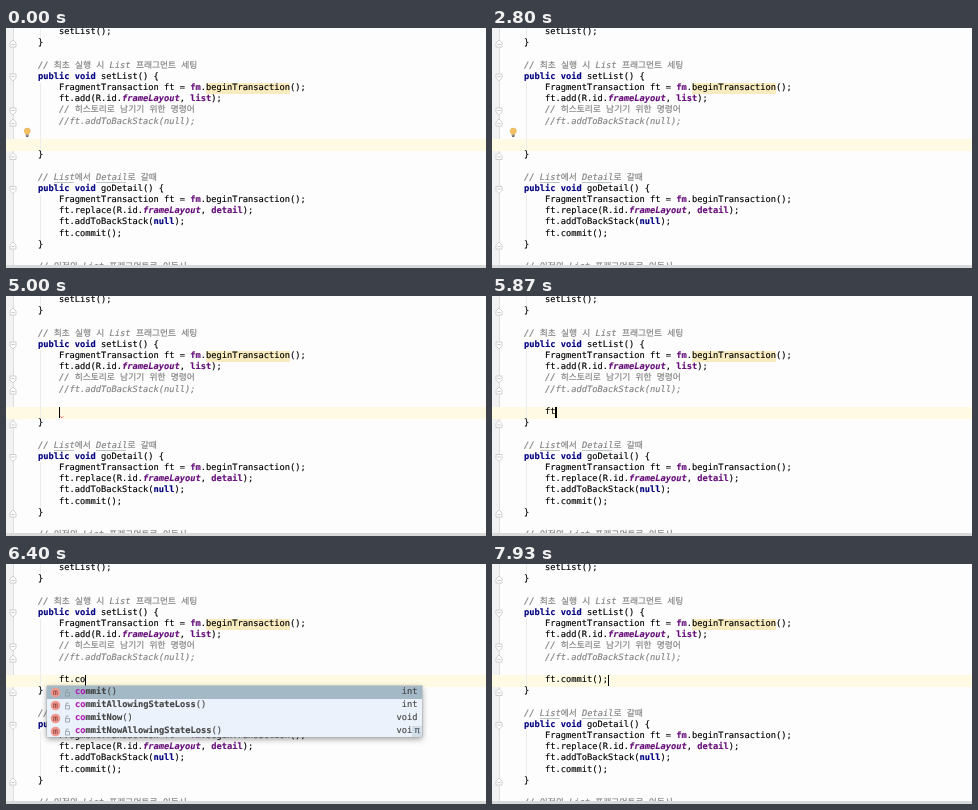
An HTML page that plays this animation: 480 px wide and 240 px high, repeating every 8 s.

```html
<!DOCTYPE html>
<html lang="ko">
<head>
<meta charset="utf-8">
<style>
html, body { margin: 0; width: 100%; height: 100%; overflow: hidden; background: #fefdfe; }
#stage {
  position: relative; width: 480px; height: 240px; overflow: hidden; background: #fefdfe; color: #000;
  font: 8.72px/11.2px "DejaVu Sans Mono", "Noto Sans CJK KR", "Noto Sans CJK", monospace;
  text-rendering: geometricPrecision; -webkit-text-stroke: .15px;
}
#stage div, #stage svg { position: absolute; left: 0; top: 0; }
#code div, #stage #typed, #popup div { white-space: pre; }
#gutter { width: 7px; height: 240px; background: #f3f2f3; border-right: 1px solid #dedede; }
#stage #row { top: 111.3px; width: 480px; height: 11.4px; background: #fffae3; }
#stage #mark { left: 200px; top: 54.5px; width: 84.4px; height: 11.4px; background: #f8ebbf; }
#stage #edge { top: 237px; width: 480px; height: 3px; background: #d9d9d9; }
#stage #typed { left: 53px; top: 111.1px; }
#stage #caret { top: 111.3px; width: 1.4px; height: 11.2px; background: #000; }
#stage #bulb { left: 17.3px; top: 99px; }
#stage #error { left: 54px; top: 119px; }
.key { color: #000080; }
.field { color: #660e7a; }
.res { font-style: italic; }
.note { color: #808080; font-style: italic; }
.note b { font-style: normal; font-weight: 400; }
#stage #popup {
  left: 41px; top: 122.3px; width: 375px; overflow: hidden; background: #ebf2fb;
  box-shadow: 0 0 0 .5px #a9b1b8, 0 2px 6px rgba(0, 0, 0, .4); color: #444;
}
#popup .item { width: 375px; height: 12.8px; line-height: 12.8px; }
#popup .item:first-child { background: #a4b9c6; }
#stage #popup .name { left: 28px; }
#stage #popup .type { left: auto; right: 4.5px; }
#popup em { font-style: normal; color: #b01fb0; }
#stage #thumb { left: 370px; top: 2px; width: 4.5px; height: 62px; border-radius: 2px; background: #6f777d; }
#stage #pi { left: 365px; top: auto; bottom: 0; width: 10px; height: 11px; background: #d3dde6; color: #456; text-align: center; }
</style>
</head>
<body>
<div id="stage">
  <div id="gutter"></div>
  <div id="row"></div>
  <div id="mark"></div>
  <svg id="lines" width="480" height="240" fill="none"></svg>
  <div id="code"></div>
  <div id="edge"></div>
  <div id="typed"></div>
  <div id="caret"></div>
  <svg id="bulb" width="8.5" height="11" viewBox="0 0 11 13">
    <path d="M3.5 9C3.5 7.5 1.5 7 1.5 4.8a4 4 0 0 1 8 0C9.5 7 7.5 7.5 7.5 9z" fill="#f3c061" stroke="#d9a64a" stroke-width=".6"/>
    <path d="M3.5 10h4M4 11.600h3" stroke="#666" stroke-width="1.300"/>
  </svg>
  <svg id="error" width="5" height="4" fill="none">
    <path d="M.5 1.500l1.300 1.300 1.300-1.300" stroke="#e33" stroke-width=".9"/>
  </svg>
  <div id="popup"></div>
</div>
<script>
const $ = id => document.getElementById(id);
const CHAR = 5.25, PITCH = 11.2, LOOP = 8000;

const code = `    setList();
}

// 최초 실행 시 List 프래그먼트 세팅
public void setList() {
    FragmentTransaction ft = fm.beginTransaction();
    ft.add(R.id.frameLayout, list);
    // 히스토리로 남기기 위한 명령어
    //ft.addToBackStack(null);


}

// List에서 Detail로 갈때
public void goDetail() {
    FragmentTransaction ft = fm.beginTransaction();
    ft.replace(R.id.frameLayout, detail);
    ft.addToBackStack(null);
    ft.commit();
}

// 이전의 List 프래그먼트로 이동시`.split('\n');

function paint(line) {
  if (line.includes('//'))
    return `<span class="note">${line.replace(/[가-힣]+/g, '<b>$&</b>')}</span>`;
  return line.replace(/\b(public|void|null)\b|\b(fm|list|detail)\b|\bframeLayout\b/g, (word, key, field) =>
    `<b class="${key ? 'key' : field ? 'field' : 'field res'}">${word}</b>`);
}

$('code').innerHTML = code.map((line, i) =>
  `<div style="left:32px;top:${(i * PITCH - 1.1).toFixed(1)}px">${paint(line)}</div>`).join('');

// Fold markers (1 opens, -1 closes), indent guides and wavy underlines
const folds = [[15.5, -1], [49.5, 1], [83.5, 1], [94.5, -1], [128, -1], [162, 1], [217.5, -1]];
const wave = (x, width) => `<path d="M${x} 155${'l1 -1l1 1'.repeat(width / 2)}" stroke="#93a393" stroke-width=".6"/>`;
$('lines').innerHTML = '<path d="M34.500 0v10M34.500 55v67M34.500 167v45" stroke="#ececec"/>' +
  folds.map(([y, dir]) =>
    `<path d="M4 ${y - 3.5 * dir}h6v${4 * dir}l-3 ${3 * dir}l-3 ${-3 * dir}z" fill="#fff" stroke="#c4c4c4" stroke-width=".8"/>
     <path d="M5.500 ${y - dir}h3" stroke="#aaa" stroke-width=".7"/>`).join('') + wave(48, 20) + wave(90, 31);

const FT = 'FragmentTransaction';
const items = [
  ['commit', '()', 'int'],
  ['commitAllowingStateLoss', '()', 'int'],
  ['commitNow', '()', 'void'],
  ['commitNowAllowingStateLoss', '()', 'void'],
  ['setBreadCrumbShortTitle', '(CharSequence text)', FT],
  ['setBreadCrumbShortTitle', '(int res)', FT],
  ['setBreadCrumbTitle', '(CharSequence text)', FT],
  ['setBreadCrumbTitle', '(int res)', FT],
  ['setCustomAnimations', '(int enter, int exit)', FT],
  ['setCustomAnimations', '(int enter, int exit, int popEnter)', FT]
];

const lock = '<path d="M18.500 6.500h4v3.500h-4zM19 6.500v-1.500a1.200 1.200 0 0 1 2.400 0" fill="none" stroke="#8d989f" stroke-width=".8"/>';
const icon = name => `<svg width="26" height="13">${name == 'setCustomAnimations'
  ? '<rect x="4.500" y="2" width="8.500" height="9" fill="#7fa9d0"/><path d="M6 4.500h5.500M6 6.500h5.500M6 8.500h4" stroke="#e8f2fb" stroke-width=".8"/>'
  : '<circle cx="8.500" cy="6.500" r="4.800" fill="#ee9a90"/><text x="8.500" y="8.900" font-size="8" text-anchor="middle" fill="#7c3029">m</text>'}${lock}</svg>`;

function popupHtml(prefix) {
  const found = items.filter(([name]) => name.toLowerCase().includes(prefix));
  const rows = found.map(([name, args, type], i) =>
    `<div class="item" style="top:${(i * 12.8).toFixed(1)}px">${icon(name)}<div class="name"><b>${
      name.replace(new RegExp(prefix, 'i'), '<em>$&</em>')}</b>${args}</div><div class="type">${type}</div></div>`);
  $('popup').style.height = found.length * 12.8 + 'px';
  return rows.join('') + (found.length > 4 ? '<div id="thumb"></div>' : '<div id="pi">π</div>');
}

const keys = [
  [-800, ''], [3700, ''], [5530, 'f'], [5670, 'ft'], [5950, 'ft.'], [6070, 'ft.c'], [6270, 'ft.co'],
  [6470, 'ft.com'], [6670, 'ft.comm'], [7330, 'ft.commit()'], [7670, 'ft.commit();']
];
const show = (id, on) => $(id).style.visibility = on ? 'visible' : 'hidden';
let shown = null;

function draw(now) {
  const t = now % LOOP;
  const [since, text] = keys.filter(([at]) => at <= t).pop();
  if (text !== shown) {
    shown = text;
    $('typed').textContent = text;
    $('caret').style.left = 52.8 + text.length * CHAR + 'px';
    const prefix = /^ft\.(c\w*)$/.exec(text);
    show('popup', prefix);
    $('popup').innerHTML = prefix ? popupHtml(prefix[1]) : '';
  }
  show('caret', (t - since) % 1000 < 500);
  show('bulb', t < 3700);
  show('error', t >= 4200 && !text);
  requestAnimationFrame(draw);
}
draw(0);
</script>
</body>
</html>
```
